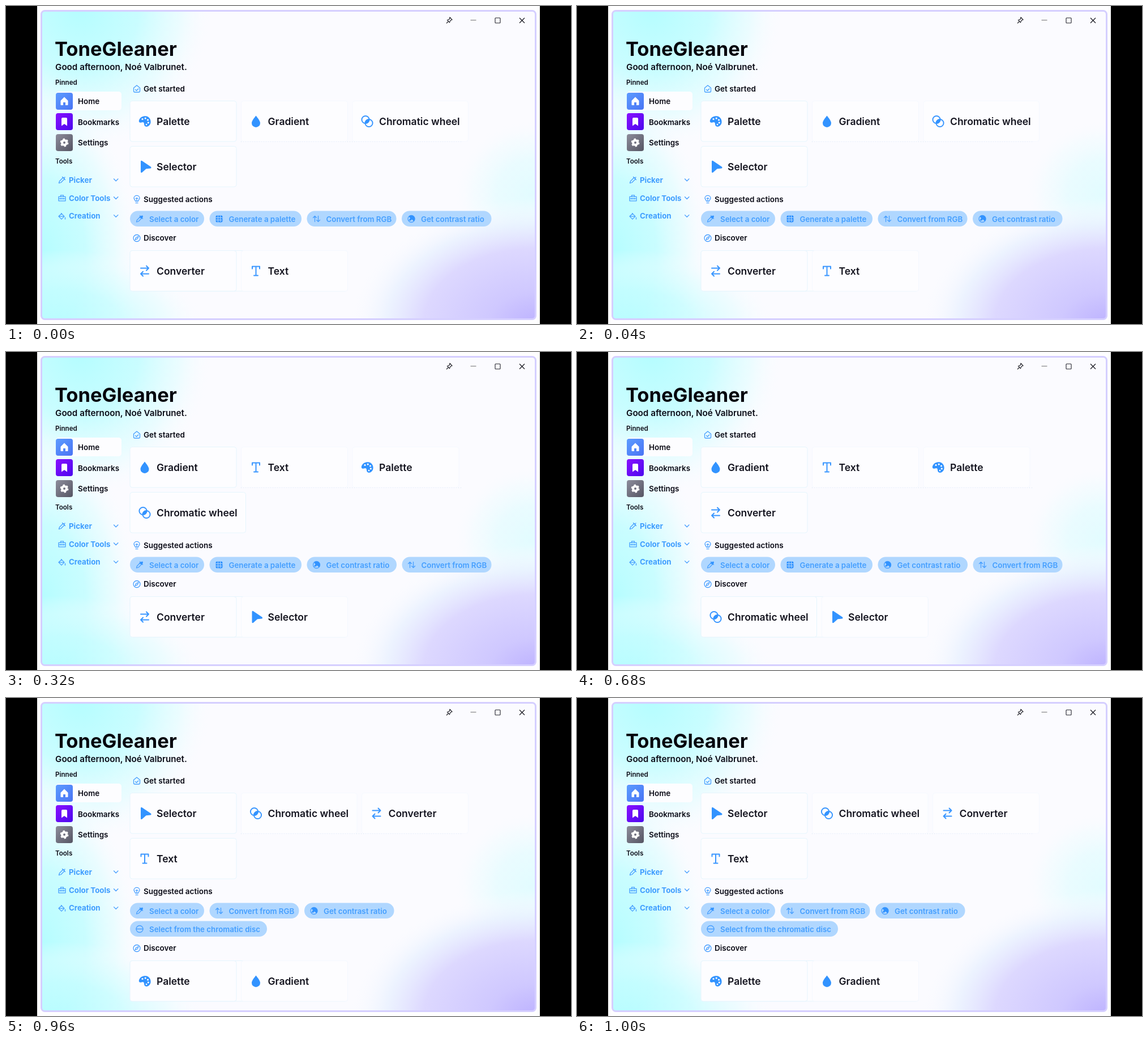
Animation of 998x561 px, one loop 1280 ms. Source, as an HTML page:

```html
<!DOCTYPE html>
<html lang="en">
<head>
<meta charset="utf-8">
<title>Color tools</title>
<style>
html, body { margin: 0; width: 100%; height: 100%; overflow: hidden; background: #000; }
svg { display: block; width: 100%; height: 100%; }
text { font-family: Inter, "Open Sans", sans-serif; font-weight: 600; fill: #0b0b16; }
.title { font-size: 34.5px; font-weight: 700; fill: #03030c; }
.greeting { font-size: 15.2px; }
.label { font-size: 11.6px; }
.nav { font-size: 13.4px; }
.tool { font-size: 13.3px; font-weight: 700; fill: #3f9dff; }
.head { font-size: 13.5px; }
.name { font-size: 17.5px; fill: #14141f; }
.chip { font-size: 13.3px; fill: #459fff; }
.line { fill: none; stroke: #489fff; stroke-width: 1.3; stroke-linecap: round; stroke-linejoin: round; }
.bold { fill: none; stroke: #3996ff; stroke-width: 2; stroke-linecap: round; stroke-linejoin: round; }
.solid { fill: #3293ff; }
.chrome { fill: none; stroke: #22222a; stroke-width: 1.1; }
.card { fill: #fdfdff; stroke: #e6f5fd; }
.pill { fill: #b0d7ff; }
.state { opacity: 0; animation: show 1280ms step-end infinite; }
@keyframes show { 0% { opacity: 1; } 25%, 100% { opacity: 0; } }
</style>
</head>
<body>
<svg viewBox="0 0 998 561" preserveAspectRatio="none">
  <defs>
    <radialGradient id="cyan">
      <stop offset="0" stop-color="#b4fdff"/>
      <stop offset=".45" stop-color="#c4fdff" stop-opacity=".9"/>
      <stop offset=".75" stop-color="#dffdff" stop-opacity=".6"/>
      <stop offset="1" stop-color="#fbfcff" stop-opacity="0"/>
    </radialGradient>
    <radialGradient id="lavender">
      <stop offset="0" stop-color="#bdb2ff"/>
      <stop offset=".25" stop-color="#cfc8ff"/>
      <stop offset=".6" stop-color="#ddd8ff"/>
      <stop offset=".8" stop-color="#e9f1ff" stop-opacity=".8"/>
      <stop offset="1" stop-color="#fbfcff" stop-opacity="0"/>
    </radialGradient>
    <linearGradient id="blue" x2="1" y2="1"><stop stop-color="#5c9bff"/><stop offset="1" stop-color="#4a74f4"/></linearGradient>
    <linearGradient id="violet" x2="1" y2="1"><stop stop-color="#8a10ff"/><stop offset="1" stop-color="#4a08ee"/></linearGradient>
    <linearGradient id="gray" x2="1" y2="1"><stop stop-color="#8d8d9c"/><stop offset="1" stop-color="#555563"/></linearGradient>
    <clipPath id="window"><rect x="63" y="8" width="872" height="544" rx="6"/></clipPath>

    <g id="palette">
      <path class="solid" d="M-10-2C-8-9 1-11 6-8C12-4 12 5 7 8C3 11-1 9-1 5C-1 1-3 1-6 2C-9 3-11 1-10-2Z"/>
      <g fill="#fdfdff"><circle cx="-4" cy="-4" r="1.6"/><circle cx="1.2" cy="-5.4" r="1.6"/><circle cx="5.5" cy="-2.5" r="1.6"/><circle cx="6.3" cy="2.3" r="1.6"/><circle cx="3" cy="5.6" r="1.4"/></g>
    </g>
    <path id="drop" class="solid" d="M0-10C3-6 7.5-1 7.5 3.2A7.5 7.3 0 0 1-7.5 3.2C-7.5-1-3-6 0-10Z"/>
    <g id="wheel"><circle class="bold" cx="-3" cy="-3" r="6.6"/><circle class="bold" cx="3" cy="3" r="6.6"/><path class="solid" d="M-3.6 3.6A6.6 6.6 0 0 1 3.6-3.6A6.6 6.6 0 0 1-3.6 3.6Z"/></g>
    <path id="cursor" class="solid" d="M-7-9Q-7-11.500-5-10.500L11 .2Q12.500 2.500 10 3L2.500 3.800L-4.500 10Q-7 11.500-7 9Z"/>
    <path id="swap" class="bold" d="M-7-5H7M3-9L7-5L3-1M7 5H-7M-3 1L-7 5L-3 9"/>
    <path id="letter" class="bold" d="M-6.500-4V-8H6.500V-4M0-8V8M-3.500 8H3.500"/>

    <g id="dropper"><path class="line" d="M-5.500 5.500L-4.500 2L2-4.500L4.500-2L-2 4.500ZM.5-5.500L5.500-.5"/><path class="line" stroke-width="3" d="M3.500-3.500L5-5"/></g>
    <g id="darkdropper"><use href="#dropper"/><path class="solid" d="M-1-3L2-5L5-6L6-4L4 0Z"/></g>
    <g id="grid"><rect class="solid" x="-6" y="-6" width="12" height="12" rx="2"/><path stroke="#b0d7ff" d="M-6-2H6M-6 2H6M-2-6V6M2-6V6"/><path class="line" d="M2 6L6 2"/></g>
    <path id="updown" class="line" d="M-3 5V-5M-6-2L-3-5L0-2M3-5V5M0 2L3 5L6 2"/>
    <g id="contrast"><circle class="line" r="6"/><path class="solid" d="M-4.500-4.500A6.300 6.300 0 0 1 4.500 4.500L1 1L-1 3L-5 3L-2-1Z"/></g>
    <g id="disc"><circle class="line" r="6"/><path class="line" d="M-6 0H6"/></g>
    <path id="house" class="line" d="M-5.500-1.500L0-6L5.500-1.500V4Q5.500 6 3.500 6H-3.500Q-5.500 6-5.500 4ZM-2.500 1.500L-.5 3.300L2.800 0"/>
    <path id="bulb" class="line" d="M-2.500 3C-2.500 1-5-.5-5-2.500A5 4.500 0 0 1 5-2.500C5-.5 2.500 1 2.500 3ZM-2 6H2M0-3V3M-2-2H2"/>
    <g id="compass"><circle class="line" r="6"/><path class="line" d="M3-3L1.200 1.200L-3 3L-1.200-1.200Z"/></g>
    <path id="toolbox" class="line" d="M-6-2.500H6V5H-6ZM-2.500-2.500V-5H2.500V-2.500M-6 1H6M-2 0V2M2 0V2"/>
    <path id="bucket" class="line" d="M-1.500-5L4 .5L-1 5.500L-6 .5L-.5-4.500M-6 .5H4M5.500 2.500V5.500"/>
  </defs>

  <rect x="55" width="888" height="561" fill="#fefeff"/>
  <g clip-path="url(#window)">
    <rect x="63" y="8" width="872" height="544" fill="#fbfbff"/>
    <ellipse cx="130" cy="0" rx="235" ry="260" fill="url(#cyan)"/>
    <ellipse cx="62" cy="440" rx="175" ry="300" fill="url(#cyan)"/>
    <ellipse cx="90" cy="560" rx="260" ry="130" fill="url(#cyan)" opacity=".8"/>
    <ellipse cx="930" cy="330" rx="140" ry="130" fill="url(#cyan)" opacity=".35"/>
    <ellipse cx="936" cy="560" rx="330" ry="220" fill="url(#lavender)"/>
  </g>
  <rect x="62.500" y="8.500" width="873" height="544" rx="6" fill="none" stroke="#d5cfff" stroke-width="3"/>

  <g class="chrome">
    <path d="M784 20L788 24L785 25.500L783.500 29L779.500 25L783 23.500ZM781.500 27L778 30.500"/>
    <path d="M820.500 25H830.500" stroke="#777"/>
    <rect x="864" y="21" width="9" height="9" rx="1"/>
    <path d="M907 21L916 30M916 21L907 30" stroke-width="1.400"/>
  </g>

  <text class="title" x="86" y="87.500">ToneGleaner</text>
  <text class="greeting" x="87" y="113">Good afternoon, Noé Valbrunet.</text>
  <text class="label" x="87" y="139">Pinned</text>
  <text class="label" x="87" y="277.500">Tools</text>

  <rect x="88" y="151" width="116" height="33" rx="5" fill="#fdfdff"/>
  <rect x="88" y="153" width="30" height="30" rx="4" fill="url(#blue)"/>
  <rect x="88" y="189" width="30" height="30" rx="4" fill="url(#violet)"/>
  <rect x="88" y="226" width="30" height="30" rx="4" fill="url(#gray)"/>
  <g fill="#fff">
    <path d="M96.500 167L103 160.500L109.500 167V174Q109.500 175 108.500 175H105V170H101V175H97.500Q96.500 175 96.500 174Z"/>
    <path d="M98 199Q98 197 100 197H106Q108 197 108 199V211.500L103 208L98 211.500Z"/>
  </g>
  <circle cx="103" cy="241" r="4" fill="none" stroke="#fff" stroke-width="4"/>
  <circle cx="103" cy="241" r="6.200" fill="none" stroke="#fff" stroke-width="2.400" stroke-dasharray="3.250"/>
  <text class="nav" x="127" y="173">Home</text>
  <text class="nav" x="127" y="209.500">Bookmarks</text>
  <text class="nav" x="127" y="246">Settings</text>

  <g id="tools"></g>
  <g id="sections"></g>
  <path d="M415 239.500H806" stroke="#d3e3f2" stroke-dasharray="1 3"/>
  <g id="states"></g>
</svg>
<script>
const LEFT = 219, PERIOD = 1280;
const cards = {
  Palette: ['palette', 188], Gradient: ['drop', 188], 'Chromatic wheel': ['wheel', 204.5],
  Selector: ['cursor', 188], Converter: ['swap', 188], Text: ['letter', 188]
};
const chips = {
  'Select a color': ['darkdropper', 131], 'Generate a palette': ['grid', 162.5],
  'Convert from RGB': ['updown', 158], 'Get contrast ratio': ['contrast', 158.5],
  'Select from the chromatic disc': ['disc', 242]
};
const [PICK, MAKE, RGB, RATIO, DISC] = Object.keys(chips);
const states = [
  { start: ['Palette', 'Gradient', 'Chromatic wheel', 'Selector'], actions: [[PICK, MAKE, RGB, RATIO]], discover: ['Converter', 'Text'] },
  { start: ['Gradient', 'Text', 'Palette', 'Chromatic wheel'], actions: [[PICK, MAKE, RATIO, RGB]], discover: ['Converter', 'Selector'] },
  { start: ['Gradient', 'Text', 'Palette', 'Converter'], actions: [[PICK, MAKE, RATIO, RGB]], discover: ['Chromatic wheel', 'Selector'] },
  { start: ['Selector', 'Chromatic wheel', 'Converter', 'Text'], actions: [[PICK, RGB, RATIO], [DISC]], discover: ['Palette', 'Gradient'] }
];

const icon = (id, x, y) => `<use href="#${id}" x="${x}" y="${y}"/>`;
const text = (style, x, y, label) => `<text class="${style}" x="${x}" y="${y}">${label}</text>`;
const section = (id, y, label) => icon(id, 231, y) + text('head', 243, y + 4.8, label);

// Lays items out from left to right, each as wide as its content
function row(names, kinds, gap, draw) {
  let x = LEFT;
  return names.map(name => {
    const [id, width] = kinds[name];
    const markup = draw(name, id, x, width);
    x += width + gap;
    return markup;
  }).join('');
}

const cardRow = (names, y) => row(names, cards, 8.5, (name, id, x, width) =>
  `<rect class="card" x="${x}" y="${y}" width="${width}" height="71.5" rx="4" ${x > LEFT ? 'style="stroke:#f5f8ff"' : ''}/>` +
  icon(id, x + 26, y + 36) + text('name', x + 47, y + 42, name));

const chipRow = (names, y) => row(names, chips, 9.5, (name, id, x, width) =>
  `<rect class="pill" x="${x}" y="${y}" width="${width}" height="27.5" rx="13.75"/>` +
  icon(id, x + 17, y + 14) + text('chip', x + 34, y + 19, name));

function panel(names, y) {
  const width = names.reduce((sum, name) => sum + cards[name][1], 8.5);
  return `<rect class="card" x="${LEFT}" y="${y}" width="${width}" height="71.5" rx="4"/>` + cardRow(names, y);
}

function drawState({ start, actions, discover }, i) {
  const shift = (actions.length - 1) * 32;
  const delay = i * PERIOD / states.length - PERIOD;
  return `<g class="state" style="animation-delay:${delay}ms">` +
    cardRow(start.slice(0, 3), 167.5) + cardRow(start.slice(3), 247.5) +
    actions.map((names, r) => chipRow(names, 361.5 + r * 32)).join('') +
    section('compass', 409.5 + shift, 'Discover') + panel(discover, 431.5 + shift) + '</g>';
}

const fill = (id, markup) => { document.getElementById(id).innerHTML = markup; };
fill('tools', [['dropper', 'Picker'], ['toolbox', 'Color Tools'], ['bucket', 'Creation']].map(([id, label], i) => {
  const y = 307 + i * 31.8;
  return icon(id, 99, y) + text('tool', 111, y + 4.7, label) +
    `<path class="line" d="M190.5 ${y - 2}l3.7 3.7l3.7-3.7"/>`;
}).join(''));
fill('sections', section('house', 146, 'Get started') + section('bulb', 341.3, 'Suggested actions'));
fill('states', states.map(drawState).join(''));
</script>
</body>
</html>
```
